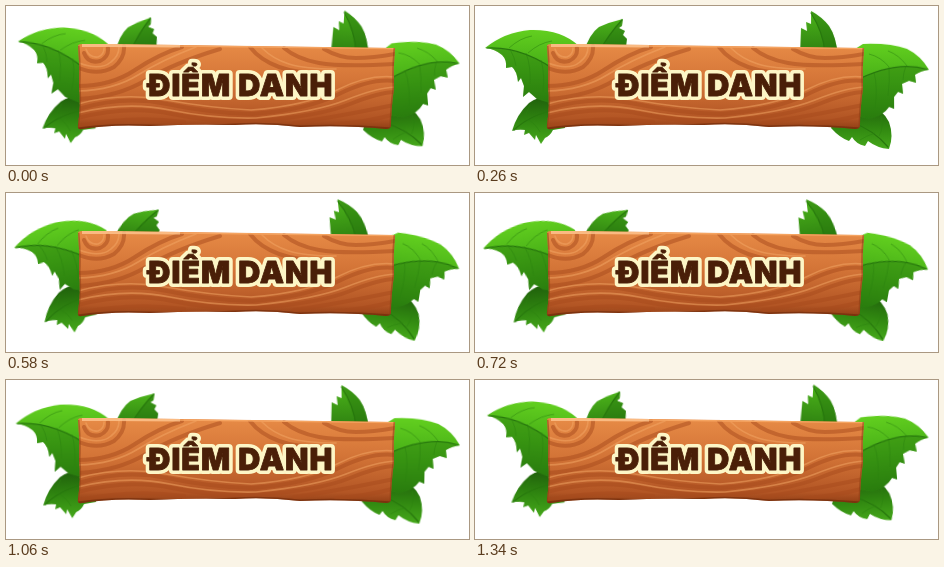
These frames come from a looping animation (463x159 px, 1.36 s). An HTML page:

```html
<!DOCTYPE html>
<html lang="vi">
<head>
<meta charset="utf-8">
<title>Điểm danh</title>
<style>
  html, body { margin: 0; width: 100%; height: 100%; overflow: hidden; background: #fff; }
  svg { display: block; width: 463px; height: 159px; }
  .leaf { animation: sway 680ms cubic-bezier(.37, 0, .63, 1) infinite alternate; }
  .shade { fill: #1d680b; opacity: .35; }
  .rib { fill: none; stroke: #27770d; stroke-width: 1.2; stroke-linecap: round; }
  .vein { fill: none; stroke: #2c8310; stroke-width: .9; opacity: .6; }
  .band { fill: none; stroke: #a84b1c; stroke-width: 4; stroke-linecap: round; opacity: .5; }
  .glow { fill: none; stroke: #f3a766; stroke-width: 1.6; stroke-linecap: round; opacity: .5; }
  text {
    font: 900 30.5px Inter, "Noto Sans", sans-serif;
    letter-spacing: 1px;
    text-anchor: middle;
    stroke-linejoin: round;
  }
  .halo { fill: #fdf6c6; stroke: #fdf6c6; stroke-width: 8px; }
  .word { fill: #4a1f08; stroke: #4a1f08; stroke-width: .8px; }
  @keyframes sway {
    from { transform: rotate(var(--from)); }
    to { transform: rotate(var(--to)); }
  }
</style>
</head>
<body>
<svg viewBox="0 0 463 159">
  <defs>
    <linearGradient id="bright" x1="0" y1="0" x2="0" y2="1">
      <stop offset="0" stop-color="#62cf1f"/>
      <stop offset=".5" stop-color="#47ae17"/>
      <stop offset="1" stop-color="#2f8710"/>
    </linearGradient>
    <linearGradient id="deep" x1="0" y1="0" x2="0" y2="1">
      <stop offset="0" stop-color="#1f5f0b"/>
      <stop offset=".5" stop-color="#2f8510"/>
      <stop offset="1" stop-color="#45a81a"/>
    </linearGradient>
    <linearGradient id="small" x1="0" y1="0" x2="0" y2="1">
      <stop offset="0" stop-color="#4cb41a"/>
      <stop offset="1" stop-color="#2c7d10"/>
    </linearGradient>
    <linearGradient id="wood" x1="0" y1="0" x2="0" y2="1">
      <stop offset="0" stop-color="#e88c47"/>
      <stop offset=".45" stop-color="#d37437"/>
      <stop offset=".85" stop-color="#b25524"/>
      <stop offset="1" stop-color="#873811"/>
    </linearGradient>
    <clipPath id="face">
      <path d="M72 40Q72 38 76 38L104 38L389 42Q387 62 388 82Q385 104 385 119Q385 123 380 123Q340 119 294 121Q260 117 229 119Q185 118 144 120Q105 118 76 123Q71 124 72 119Q75 100 73 80Q74 60 72 40Z"/>
    </clipPath>
  </defs>

  <!-- top leaves -->
  <g class="leaf" style="--from:-5deg;--to:10deg;transform-origin:128px 45px">
    <path fill="url(#small)" d="M148 13L147 20L144 22L150 25L148 29L152 33L150 48H108Q114 28 124 21Q135 16 148 13Z"/>
    <path class="shade" d="M148 13L147 20L144 22L150 25L148 29L152 33L150 48H124Q134 28 148 13Z"/>
    <path class="rib" d="M147 14Q134 28 124 46"/>
  </g>
  <g class="leaf" style="--from:3.5deg;--to:-7deg;transform-origin:345px 45px">
    <path fill="url(#small)" d="M336 5Q347 11 354 20Q361 30 363 50H325L326 22L332 25L331 16L336 18Z"/>
    <path class="shade" d="M336 5Q347 11 354 20Q361 30 363 50H350Q348 26 336 5Z"/>
    <path class="rib" d="M336 7Q348 26 350 46"/>
  </g>

  <!-- bottom leaves -->
  <g class="leaf" style="--from:3deg;--to:-6deg;transform-origin:82px 112px">
    <path fill="url(#deep)" d="M37 125Q42 108 54 97Q66 88 84 92L90 122L78 124Q75 130 70 132L66 138L61 129L60 134L54 127L49 129L50 124Q43 123 37 125Z"/>
    <path class="rib" d="M39 124Q56 108 84 103"/>
    <path class="vein" d="M50 114Q51 106 55 99M52 113Q60 117 65 126"/>
  </g>
  <g class="leaf" style="--from:-4.5deg;--to:9.500deg;transform-origin:380px 110px">
    <path fill="url(#deep)" d="M414 143Q419 130 414 116Q407 102 390 98L360 112L356 122Q365 132 374 135L377 131Q381 138 390 140L393 135Q402 142 414 143Z"/>
    <path class="rib" d="M413 141Q399 124 376 116"/>
    <path class="vein" d="M404 130Q409 122 406 110M400 127Q391 130 385 134"/>
  </g>

  <!-- side leaves -->
  <g class="leaf" style="--from:5deg;--to:-10.500deg;transform-origin:85px 60px">
    <path fill="url(#bright)" d="M10 42Q30 26 55 24Q86 23 104 40L96 98L78 98L62 93L54 86L48 91L49 80L46 72L43 76Q42 65 37 61L31 62Q32 54 27 49Q20 43 10 42Z"/>
    <path class="shade" d="M10 42Q50 40 88 70L84 98L78 98L62 93L54 86L48 91L49 80L46 72L43 76Q42 65 37 61L31 62Q32 54 27 49Q20 43 10 42Z"/>
    <path class="rib" d="M12 42Q50 40 88 70"/>
    <path class="vein" d="M34 42Q45 32 57 30M53 47Q64 37 77 35M35 43Q40 52 41 60M51 47Q56 60 55 78M66 54Q70 68 68 86"/>
  </g>
  <g class="leaf" style="--from:-5deg;--to:10deg;transform-origin:380px 65px">
    <path fill="url(#bright)" d="M454 64Q446 50 432 43Q415 37 388 38L366 52L374 108L394 113Q408 110 414 101L419 103L419 91L423 86L428 88L427 78L434 75L441 77L440 69Q446 65 454 64Z"/>
    <path class="shade" d="M454 64Q420 54 378 76L380 109L394 113Q408 110 414 101L419 103L419 91L423 86L428 88L427 78L434 75L441 77L440 69Q446 65 454 64Z"/>
    <path class="rib" d="M452 63.500Q420 54 378 76"/>
    <path class="vein" d="M432 60Q424 49 413 45M414 61Q406 51 394 48M431 60Q428 68 428 74M414 61Q415 74 413 90M399 66Q403 82 400 102"/>
  </g>

  <!-- board -->
  <g clip-path="url(#face)">
    <rect x="69" y="36" width="322" height="90" fill="url(#wood)"/>
    <path class="band" d="M78 47Q82 58 94 55Q103 51 102 42M73 62Q92 70 108 61Q119 52 118 40"/>
    <path class="band" d="M72 80Q105 80 129 64T176 41M72 93Q112 91 140 74T214 43"/>
    <path class="band" d="M244 41Q254 54 273 61T322 67M278 42Q291 53 313 57T389 58M318 43Q333 52 350 52T389 48"/>
    <path class="band" d="M72 103Q118 89 161 98T246 108Q301 104 333 88T389 75M72 112Q122 99 166 108T252 115Q314 110 344 98T389 86"/>
    <path class="band" d="M74 120Q125 109 178 116M288 117Q330 111 388 99M330 118Q360 116 386 109"/>
    <path class="glow" d="M80 43Q83 52 92 51Q98 49 98 42M73 57Q94 65 105 56Q113 50 113 41"/>
    <path class="glow" d="M72 85Q108 84 132 69T190 41M256 42Q267 53 283 58T330 63M72 98Q116 86 160 94T245 104Q300 100 331 84T389 71"/>
    <path class="glow" d="M72 107Q120 95 164 104T250 112Q310 106 340 94T389 81"/>
    <path fill="none" stroke="#ffc791" stroke-width="3" opacity=".8" d="M76 39.500L106 39.500L174 40"/>
    <path fill="none" stroke="#f5a461" stroke-width="1.500" d="M174 40L389 42.500"/>
    <path fill="none" stroke="#6f2a0a" stroke-width="5" opacity=".65" d="M72 124Q105 119 144 121T229 120Q260 118 294 122Q340 120 386 124"/>
    <path fill="none" stroke="#8d3d14" stroke-width="3" opacity=".55" d="M72 40Q74 60 73 80Q75 100 71 123M389 42Q387 62 388 82Q385 104 385 123"/>
  </g>

  <text class="halo" x="234" y="89.500">ĐIỂM DANH</text>
  <text class="word" x="234" y="89.500">ĐIỂM DANH</text>
</svg>
</body>
</html>
```
